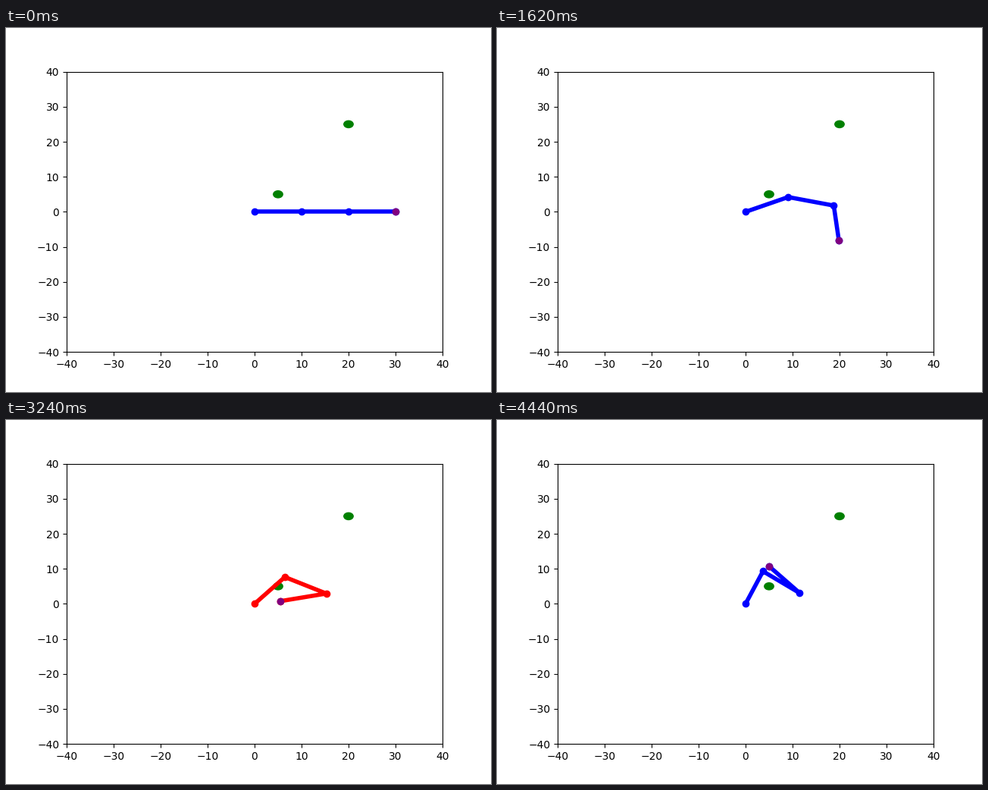
These frames come from a looping animation (640 px wide and 480 px high, 4500 ms). A matplotlib script:

```python
import numpy as np
import matplotlib.pyplot as plt
from matplotlib.animation import FuncAnimation
from matplotlib.patches import Circle

FRAMES = 75
INTERVAL = 60
LINK = 10
RATES = np.radians([0.9225, -0.52, -3.102])  # absolute link angles per frame
OBSTACLES = np.array([[5, 5], [20, 25]])
RADIUS = 1


def arm_points(frame):
    """Base, two joints and the tip of the arm."""
    angles = RATES * frame
    steps = LINK * np.column_stack([np.cos(angles), np.sin(angles)])
    return np.vstack([[0, 0], np.cumsum(steps, axis=0)])


def distance(point, start, end):
    """Shortest distance from a point to a segment."""
    link = end - start
    t = np.clip(np.dot(point - start, link) / np.dot(link, link), 0, 1)
    return np.hypot(*(point - start - t * link))


def collides(points):
    return any(
        distance(center, start, end) <= RADIUS
        for center in OBSTACLES
        for start, end in zip(points, points[1:])
    )


fig, ax = plt.subplots(figsize=(6.4, 4.8), dpi=100)
ax.set_xlim(-40, 40)
ax.set_ylim(-40, 40)
for center in OBSTACLES:
    ax.add_patch(Circle(center, RADIUS, color="green"))

arm, = ax.plot([], [], "o-", lw=4)
tip, = ax.plot([], [], "o", color="purple")


def update(frame):
    points = arm_points(frame)
    arm.set_data(points[:, 0], points[:, 1])
    arm.set_color("red" if collides(points) else "blue")
    tip.set_data(points[-1:, 0], points[-1:, 1])
    return arm, tip


anim = FuncAnimation(fig, update, frames=FRAMES, interval=INTERVAL,
                     repeat=True, repeat_delay=0)
plt.show()
```
